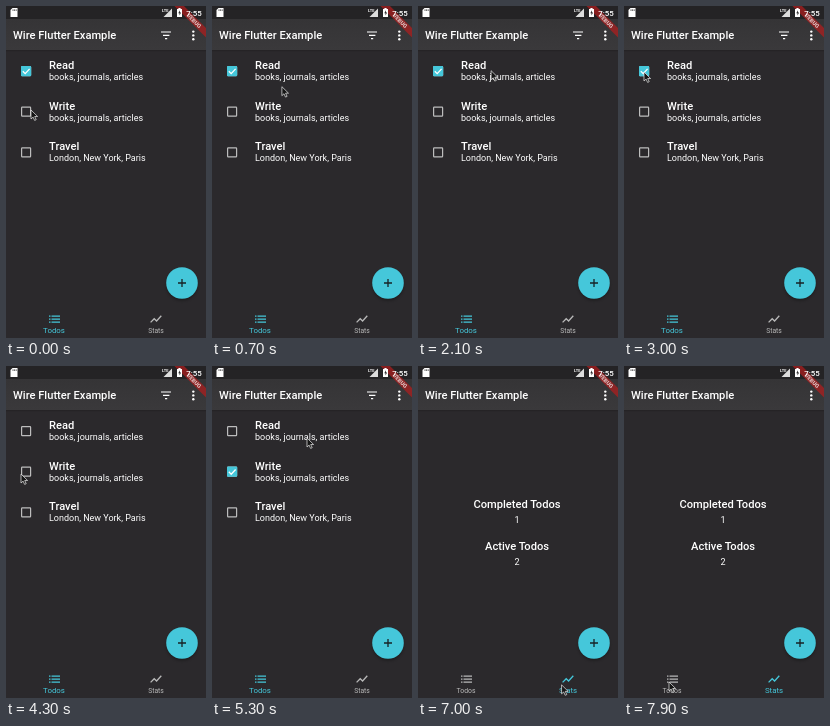
Animation of 200x332 px, one loop 8 s. Source, as an HTML page:

```html
<!DOCTYPE html>
<html lang="en">
<head>
<meta charset="utf-8">
<title>Todo app demo</title>
<style>
  html, body { margin: 0; width: 100%; height: 100%; overflow: hidden; background: #2b292c; }
  svg { display: block; width: 100%; height: 100%; }
  text { font-family: Roboto, "Open Sans", sans-serif; fill: #fff; }
  .title { font-size: 11.15px; font-weight: 500; }
  .body { font-size: 9px; }
  .mid { text-anchor: middle; }
  .line { fill: none; stroke: currentColor; stroke-width: 1.3; }
  .tab text { fill: currentColor; text-anchor: middle; }
</style>
</head>
<body>
<svg viewBox="0 0 200 332" preserveAspectRatio="none">
  <defs>
    <linearGradient id="bar" x2="0" y2="1">
      <stop offset=".3" stop-color="#353436"/>
      <stop offset="1" stop-color="#3a393b"/>
    </linearGradient>
    <linearGradient id="shade" x2="0" y2="1">
      <stop stop-color="#000" stop-opacity=".2"/>
      <stop offset="1" stop-color="#000" stop-opacity="0"/>
    </linearGradient>
    <filter id="soft" x="-50%" y="-50%" width="200%" height="200%"><feGaussianBlur stdDeviation="1.8"/></filter>
    <clipPath id="navClip"><rect y="301" width="200" height="31"/></clipPath>
  </defs>

  <g id="todos"></g>
  <g id="stats" class="mid">
    <text class="title" x="99" y="142">Completed Todos</text>
    <text class="body" x="99" y="157">1</text>
    <text class="title" x="99" y="184">Active Todos</text>
    <text class="body" x="99" y="199">2</text>
  </g>

  <rect width="200" height="44" fill="url(#bar)"/>
  <rect width="200" height="13" fill="#242325"/>
  <rect y="44" width="200" height="2" fill="url(#shade)"/>
  <text class="title" x="7" y="33">Wire Flutter Example</text>
  <path id="filter" d="M155 26h10M157 29.3h6.4M159 32.6h2.2" stroke="#fff" stroke-width="1.2"/>
  <g fill="#fff">
    <circle cx="187.3" cy="25.6" r="1.2"/><circle cx="187.3" cy="29.4" r="1.2"/><circle cx="187.3" cy="33.2" r="1.2"/>
  </g>

  <circle cx="176" cy="279" r="15.5" fill="#000" opacity=".3" filter="url(#soft)"/>
  <circle cx="176" cy="277" r="15.8" fill="#45c7da"/>
  <path d="M172 277h8M176 273v8" stroke="#172326" stroke-width="1.3"/>

  <g clip-path="url(#navClip)"><circle id="ripple" fill="#fff"/></g>
  <g id="todosTab" class="tab">
    <path class="line" d="M43 310.2h1.5M43 313.2h1.5M43 316.2h1.5M45.5 310.2h8.5M45.5 313.2h8.5M45.5 316.2h8.5"/>
    <text x="48" y="327.2">Todos</text>
  </g>
  <g id="statsTab" class="tab">
    <path class="line" d="M144.6 316.4l3.6-3.7 2.4 2.3 4.7-5.2"/>
    <text x="150" y="327.2">Stats</text>
  </g>

  <g transform="translate(200) rotate(45)">
    <rect x="-24" y="15.6" width="48" height="6.7" fill="#b71c1c" opacity=".68"/>
    <text class="mid" x="2" y="20.9" font-size="5.6" font-weight="900" opacity=".7">DEBUG</text>
  </g>
  <path d="M6.5 2h5v9h-7V4z" fill="#fff"/>
  <path d="M7 3.3v1.7M8.6 3.3v1.7M10.2 3.3v1.7" stroke="#242325" stroke-width=".7"/>
  <path d="M166 2.5v8.5h-8.5z" fill="#ddd"/>
  <text x="156" y="6" font-size="4" font-weight="700">LTE</text>
  <path d="M172.4 2h2.2v1h1.4v8h-5V3h1.4z" fill="#fff"/>
  <path d="M173.9 4.2l-1.6 3h1.2v2.3l1.6-3h-1.2z" fill="#242325"/>
  <text x="180.3" y="10" font-size="7.9" font-weight="500">7:55</text>

  <path id="cursor" d="M0 0v9l2.1-1.9 1.5 3.3 1.6-.7-1.5-3.2h2.9z" fill="#161616" stroke="#eee" stroke-width=".7"/>
</svg>
<script>
const LOOP = 8000, STEP = 100;
const CYAN = '#45c7da', GREY = '#b9b9b9';
const $ = id => document.getElementById(id);
const clamp = x => Math.max(0, Math.min(1, x));
const ease = x => x * x * (3 - 2 * x);
const progress = (t, start, length) => clamp((t - start) / length);

// Pointer stops: time in ms, x, y
const stops = [
  [0, 25, 104], [200, 25, 104], [1100, 102, 64], [1700, 102, 64],
  [2700, 20, 66], [3400, 20, 66], [4100, 15, 108], [4600, 15, 108],
  [5200, 95, 72], [5500, 95, 72], [6300, 148, 319], [6900, 148, 319],
  [7700, 45, 316], [8000, 45, 316]
];
const todos = [
  { name: 'Read', note: 'books, journals, articles', checked: t => 1 - progress(t, 3100, 200) },
  { name: 'Write', note: 'books, journals, articles', checked: t => progress(t, 4300, 200) },
  { name: 'Travel', note: 'London, New York, Paris', checked: () => 0 }
];
const tap = { time: 6300, x: 150, y: 317 };
const SWITCH = 6600;

$('todos').innerHTML = todos.map(({ name, note }, i) => `
  <g transform="translate(0 ${i * 40.6})">
    <rect x="15.6" y="60.6" width="9" height="9" rx=".6" fill="none" stroke="#bdbdbd" stroke-width="1.2"/>
    <g class="tick">
      <rect x="15" y="60" width="10.2" height="10.2" rx="1" fill="${CYAN}"/>
      <path d="M16.8 65.2l2.4 2.4 4.4-4.7" fill="none" stroke="#fff" stroke-width="1.3"/>
    </g>
    <text class="title" x="43" y="63">${name}</text>
    <text class="body" x="43" y="74">${note}</text>
  </g>`).join('');
const ticks = document.querySelectorAll('.tick');

function pointerAt(t) {
  const i = Math.max(1, stops.findIndex(s => s[0] >= t));
  const [t0, x0, y0] = stops[i - 1], [t1, x1, y1] = stops[i];
  const k = ease(progress(t, t0, t1 - t0));
  return [x0 + (x1 - x0) * k, y0 + (y1 - y0) * k];
}

function setTab(tab, active) {
  tab.style.color = active > .5 ? CYAN : GREY;
  tab.querySelector('text').style.fontSize = 6.8 + 1.1 * active + 'px';
}

function drawRipple(age) {
  const ripple = $('ripple');
  const visible = age >= 0 && age < 700;
  ripple.style.display = visible ? '' : 'none';
  if (!visible) return;
  ripple.setAttribute('cx', tap.x);
  ripple.setAttribute('cy', tap.y);
  ripple.setAttribute('r', 5 + 28 * progress(age, 0, 400));
  ripple.setAttribute('opacity', .035 * (1 - progress(age, 300, 400)));
}

function draw(t) {
  todos.forEach((todo, i) => ticks[i].setAttribute('opacity', todo.checked(t)));

  const onStats = t >= SWITCH;
  $('todos').style.display = $('filter').style.display = onStats ? 'none' : '';
  $('stats').style.display = onStats ? '' : 'none';
  const shift = ease(progress(t, SWITCH - 50, 200));
  setTab($('todosTab'), 1 - shift);
  setTab($('statsTab'), shift);

  drawRipple(t - tap.time);
  $('cursor').setAttribute('transform', `translate(${pointerAt(t)})`);
}

const start = performance.now();
function tick() {
  const t = (performance.now() - start) % LOOP;
  draw(Math.floor(t / STEP) * STEP);
  requestAnimationFrame(tick);
}
tick();
</script>
</body>
</html>
```
